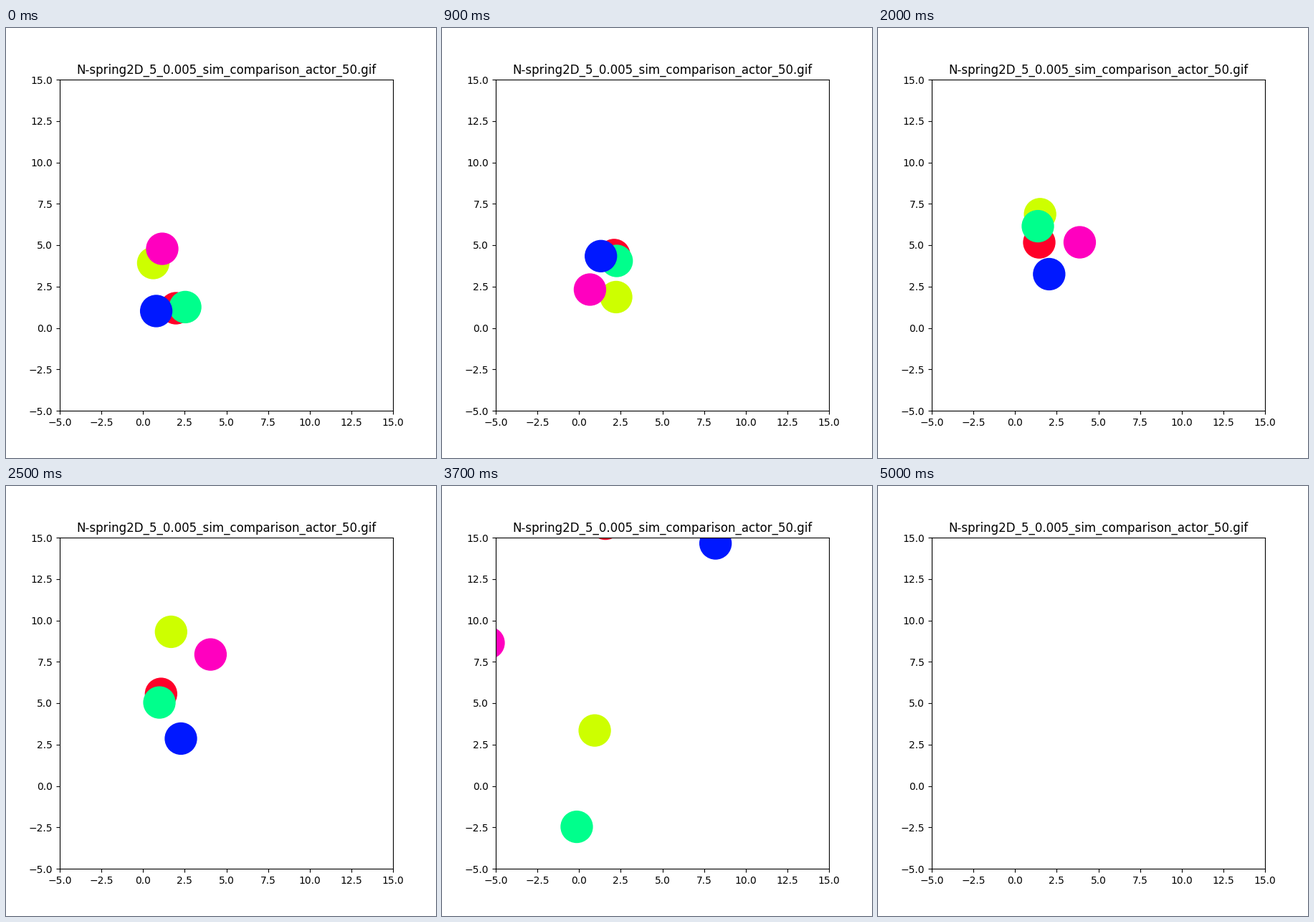
Write a matplotlib script that moves like this. It is 600 px wide and 600 px high and loops after 7.4 s.

```python
import numpy as np
import matplotlib.pyplot as plt
from matplotlib.animation import FuncAnimation

FRAMES, INTERVAL = 74, 100
DRIFT_GAIN = 0.015  # speed-up of the bodies once they fly apart

# A few poses of each body, shared by all at these steps
STEPS = np.array([0, 5, 14, 25, 32, 37])
POSES = np.array([
    [(1.97, 1.19), (2.05, 2.77), (1.99, 5.74), (1.08, 5.56), (1.24, 10.89), (1.58, 15.84)],
    [(0.61, 3.92), (1.80, 2.64), (2.10, 2.60), (1.68, 9.31), (2.76, 6.36), (0.94, 3.35)],
    [(2.53, 1.26), (2.46, 2.62), (1.87, 5.65), (0.98, 5.04), (0.44, 1.21), (-0.14, -2.47)],
    [(0.79, 1.02), (0.98, 2.66), (1.76, 5.28), (2.27, 2.86), (4.03, 9.09), (8.19, 14.65)],
    [(1.15, 4.78), (0.55, 3.74), (1.74, 1.77), (4.05, 7.94), (-0.68, 7.75), (-5.43, 8.64)],
]).swapaxes(0, 1)


def natural_spline(t, p):
    """Smooth curve through p(t); past the end it flies on, gaining speed."""
    h = np.diff(t)
    slope = np.diff(p, axis=0) / h[:, None, None]
    system, bend = np.eye(len(t)), np.zeros_like(p)
    for i in range(1, len(h)):
        system[i, i - 1:i + 2] = h[i - 1], 2 * (h[i - 1] + h[i]), h[i]
        bend[i] = 6 * (slope[i] - slope[i - 1])
    accel = np.einsum("ij,jkl->ikl", np.linalg.inv(system), bend)
    exit_speed = slope[-1] + h[-1] * accel[-2] / 6

    def at(step):
        if step > t[-1]:
            u = step - t[-1]
            return p[-1] + exit_speed * (u + DRIFT_GAIN * u**2)
        i = min(np.searchsorted(t, step, side="right") - 1, len(h) - 1)
        u = step - t[i]
        speed = slope[i] - h[i] * (2 * accel[i] + accel[i + 1]) / 6
        jerk = (accel[i + 1] - accel[i]) / h[i]
        return p[i] + u * speed + u**2 * accel[i] / 2 + u**3 * jerk / 6

    return at


positions = natural_spline(STEPS, POSES)

fig, ax = plt.subplots(figsize=(6, 6), dpi=100)
ax.set(xlim=(-5, 15), ylim=(-5, 15))
ax.set_title("N-spring2D_5_0.005_sim_comparison_actor_50.gif")
colors = plt.get_cmap("gist_rainbow")(np.linspace(0, 1, POSES.shape[1]))
dots = ax.scatter(*positions(0).T, s=1000, c=colors)


def update(step):
    dots.set_offsets(positions(step))
    return (dots,)


anim = FuncAnimation(fig, update, frames=FRAMES, interval=INTERVAL,
                     repeat=True, repeat_delay=0)
plt.show()
```
